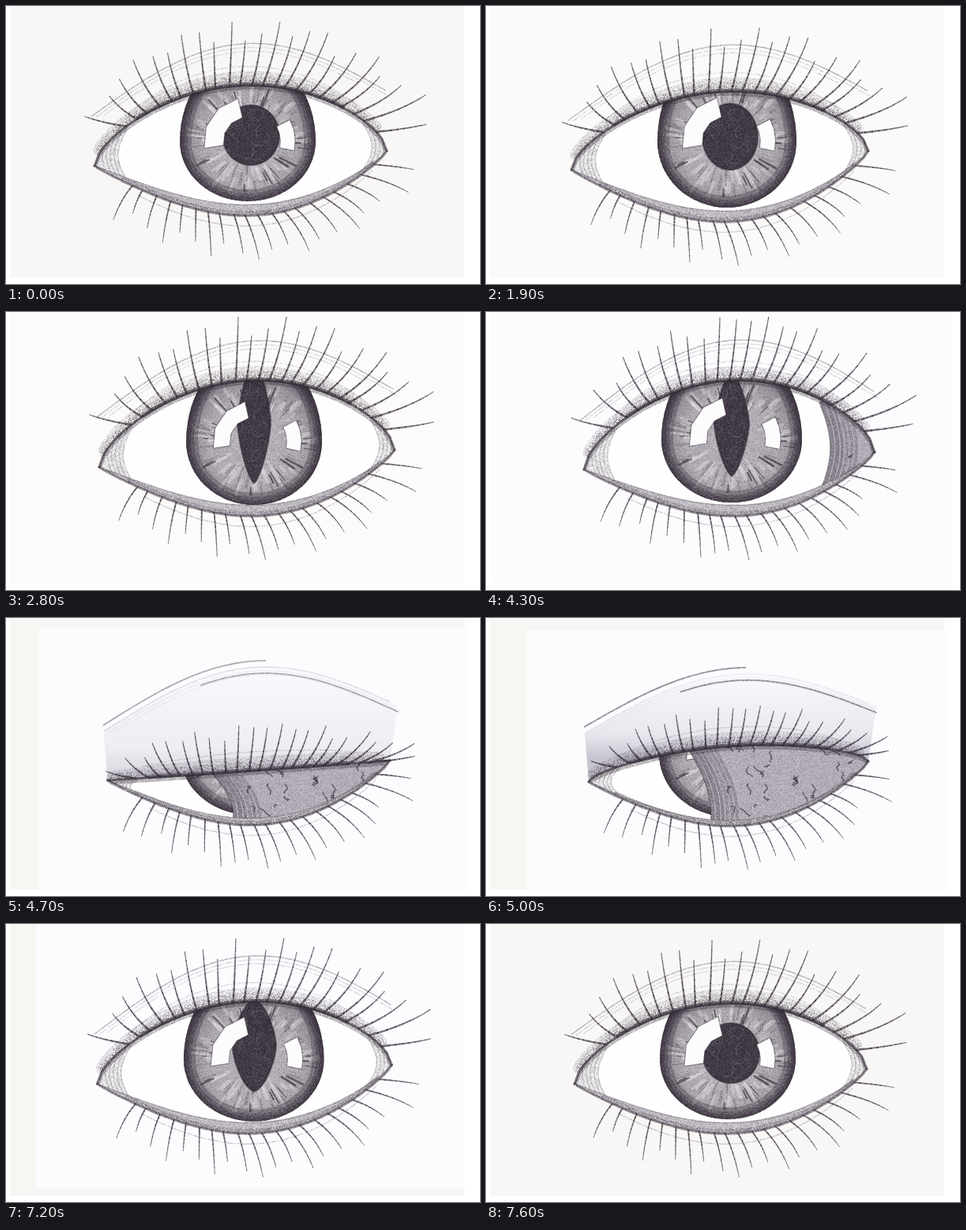
Animation, 600 px wide and 353 px high, one loop 7.7 s. Source, as an HTML page with a canvas:

```html
<!DOCTYPE html>
<html lang="en">
<head>
<meta charset="utf-8">
<title>Pencil eye</title>
<style>
html, body { margin: 0; width: 100%; height: 100%; overflow: hidden; background: #fff; }
canvas { display: block; width: 600px; height: 353px; }
</style>
</head>
<body>
<canvas id="stage" width="600" height="353"></canvas>
<script>
const ctx = document.getElementById('stage').getContext('2d');
const LOOP = 7700, STEP = 100, TAU = Math.PI * 2;

// left/right: eye corners; top/low/crown: heights of the lids and the crease;
// iris and pupil: centre and radii; haw: x of the third eyelid.
const round = {
  paper: '#f8f7f5', sheet: '#f8f7f5', frame: [5, 0, 575, 345],
  left: [112, 203], right: [482, 184], top: 101, low: 267, crown: 48,
  iris: [306, 172, 86, 76], pupil: [310, 164, 36, 38], slit: 0, haw: 500, shut: 0, lash: 1
};
const angular = {
  ...round, paper: '#fbfaf9', sheet: '#fbfaf9',
  left: [108, 208], right: [484, 184], top: 109, low: 275, crown: 50,
  iris: [305, 172, 88, 84], pupil: [309, 166, 35, 42]
};
const slit = {
  ...round, paper: '#fcfbf9', sheet: '#fcfbf9',
  left: [118, 197], right: [492, 175], top: 87, low: 260, crown: 37,
  iris: [314, 165, 86, 80], pupil: [314, 140, 21, 77], slit: 1
};
const hawStart = {
  ...slit, paper: '#fcfbfd', sheet: '#fcfbfd', frame: [12, 0, 576, 353],
  left: [124, 200], right: [492, 178], crown: 36,
  iris: [311, 162, 89, 80], pupil: [311, 142, 22, 66], haw: 430
};
const reopened = {
  ...slit, paper: '#f6f6f3', sheet: '#fcfbfe', frame: [53, 0, 527, 333],
  left: [117, 203], right: [491, 177], top: 98, low: 267, crown: 38,
  iris: [317, 172, 90, 80], pupil: [316, 150, 24, 67]
};
const half = {
  ...reopened, frame: [52, 15, 530, 330],
  left: [130, 208], right: [484, 182], top: 163, low: 265, crown: 72,
  iris: [306, 172, 87, 80], haw: 265, shut: 1, lash: 0.62
};
const closed = { ...half, top: 230, haw: 215 };
const widening = mix(reopened, round, 0.3);

const keys = [[0, round], [1800, round], [1900, angular], [2000, angular], [2500, slit], [4200, slit],
  [4300, hawStart], [4400, hawStart], [4800, closed], [5000, half], [5400, reopened], [7100, reopened],
  [7200, widening], [7300, widening], [7600, round], [LOOP, round]];

function mix(a, b, k) {
  if (typeof a === 'number') return a + (b - a) * k;
  if (typeof a === 'string') return k < 0.5 ? a : b;
  if (Array.isArray(a)) return a.map((v, i) => mix(v, b[i], k));
  return Object.fromEntries(Object.keys(a).map(n => [n, mix(a[n], b[n], k)]));
}

function poseAt(t) {
  const i = keys.findIndex(([end]) => end > t) - 1;
  const [t0, a] = keys[i], [t1, b] = keys[i + 1];
  return mix(a, b, (t - t0) / (t1 - t0));
}

let seed = 1;
function rand() {
  seed = (seed * 16807) % 2147483647;
  return seed / 2147483647;
}

// Grainy graphite as a fill or stroke style.
const leads = {};
function lead(tone) {
  if (leads[tone]) return leads[tone];
  const size = 160, tile = document.createElement('canvas');
  tile.width = tile.height = size;
  const g = tile.getContext('2d'), image = g.createImageData(size, size);
  for (let i = 0; i < size * size; i++) {
    const alpha = Math.max(0, Math.min(1, tone + (rand() + rand() - 1) * 0.22));
    image.data.set([50, 42, 53, alpha * 255], i * 4);
  }
  g.putImageData(image, 0, 0);
  return leads[tone] = ctx.createPattern(tile, 'repeat');
}
[0.06, 0.12, 0.2, 0.32, 0.5, 0.65, 0.88].forEach(lead);

function draw(path, tone, width) {
  ctx.strokeStyle = lead(tone);
  ctx.lineWidth = width;
  ctx.stroke(path);
}

function shade(path, tone) {
  ctx.fillStyle = lead(tone);
  ctx.fill(path);
}

// Path through point(u) for u from a to b, optionally appended to another path.
function trace(point, a = 0, b = 1, path = new Path2D(), steps = 60) {
  for (let i = 0; i <= steps; i++) path.lineTo(...point(a + (b - a) * i / steps));
  return path;
}

const arch = (u, power) => Math.pow(Math.max(0, Math.sin(Math.PI * u)), power);

function lids(p) {
  const chord = u => mix(p.left, p.right, u);
  const middle = chord(0.5)[1];
  const shift = (dx, dy, u) => { const [x, y] = chord(u); return [x + dx, y + dy]; };
  return {
    upper: u => shift(0, (p.top - middle) * arch(u, 0.6), u),
    lower: u => shift(0, (p.low - middle) * arch(Math.pow(u, 1.15), 0.8), u),
    crease: u => shift(15 * u - 5, -62 - 8 * u - (middle - 66 - p.crown) * arch(u, 1), u),
    uAt: x => Math.max(0, Math.min(1, (x - p.left[0]) / (p.right[0] - p.left[0])))
  };
}
const offset = (curve, dy, power = 0) => u => {
  const [x, y] = curve(u);
  return [x, y + dy * arch(u, power)];
};

function drawPaper(p) {
  ctx.fillStyle = '#fff';
  ctx.fillRect(0, 0, 600, 353);
  ctx.fillStyle = p.paper;
  ctx.fillRect(5, 0, 575, 345);
  ctx.fillStyle = p.sheet;
  ctx.fillRect(...p.frame);
}

function drawSkin(p, lid) {
  if (p.shut > 0) {
    const skin = trace(lid.upper, 1, 0, trace(lid.crease));
    const tone = ctx.createLinearGradient(0, p.crown, 0, p.top + 15);
    tone.addColorStop(0, 'rgba(120,115,140,.02)');
    tone.addColorStop(0.7, 'rgba(120,115,140,.14)');
    tone.addColorStop(1, 'rgba(120,115,140,.4)');
    ctx.globalAlpha = p.shut;
    ctx.fillStyle = tone;
    ctx.fill(skin);
    draw(trace(offset(lid.crease, -8), 0, 0.55), 0.5, 1.8);
    draw(trace(offset(lid.crease, 8), 0.33, 1), 0.5, 1.8);
    ctx.globalAlpha = 1;
  }
  ctx.globalAlpha = 1 - p.shut * 0.8;
  for (let i = 0; i < 3; i++) {
    draw(trace(offset(lid.crease, i * 5), rand() * 0.1, 0.85 + rand() * 0.15), i ? 0.12 : 0.32, 1.4);
  }
  ctx.globalAlpha = 1;
  draw(trace(offset(lid.upper, -24, 0.5), 0.1, 0.9), 0.12, 1.4);
  draw(trace(offset(lid.lower, 13, 0.5), 0.15, 0.95), 0.2, 1.3);
  for (const width of [18, 12, 7]) {
    draw(trace(offset(lid.upper, -width / 2, 0.5), 0.02, 0.96), 0.12, width);
  }
}

function ring(cx, cy, rx, ry) {
  const path = new Path2D();
  path.ellipse(cx, cy, rx, ry, 0, 0, Math.PI);
  path.ellipse(cx, cy, rx, ry * 1.45, 0, Math.PI, TAU);
  return path;
}

function drawGlint([cx, cy, r], a0, a1, inner, outer) {
  const arc = k => a => [cx + Math.cos(a) * r * k, cy + Math.sin(a) * r * k];
  const path = trace(arc(inner), a1, a0, trace(arc(outer), a0, a1, undefined, 3), 3);
  path.closePath();
  ctx.fillStyle = '#fdfcfd';
  ctx.fill(path);
  draw(path, 0.5, 1.2);
}

function drawPupil(p) {
  const [cx, cy, w, h] = p.pupil;
  const bend = v => Math.sign(v) * Math.pow(Math.abs(v), 1 + p.slit * 0.4);
  const pupil = trace(a => [cx + bend(Math.cos(a)) * w, cy + bend(Math.sin(a)) * h], 0, TAU);
  shade(pupil, 0.88);
  draw(pupil, 0.65, 2);
  ctx.save();
  ctx.clip(pupil);
  ctx.strokeStyle = 'rgba(150,140,155,.35)';
  ctx.lineWidth = 1;
  for (let i = 0; i < 16; i++) {
    ctx.beginPath();
    ctx.arc(cx + (rand() - 0.5) * w * 1.6, cy + (rand() - 0.5) * h * 1.6, 4 + rand() * 9, i, i + 2);
    ctx.stroke();
  }
  ctx.restore();
}

function drawIris(p) {
  const [cx, cy, rx, ry] = p.iris;
  const disc = ring(cx, cy, rx, ry);
  ctx.save();
  ctx.clip(disc);
  const tone = ctx.createRadialGradient(cx, cy, 25, cx, cy, rx * 1.05);
  tone.addColorStop(0, '#c6c1c8');
  tone.addColorStop(0.5, '#c0bbc2');
  tone.addColorStop(0.8, '#a29ba4');
  tone.addColorStop(1, '#6b636d');
  ctx.fillStyle = tone;
  ctx.fill(disc);
  shade(disc, 0.12);
  for (let i = 0; i < 150; i++) {
    const a = rand() * TAU, bold = i % 7 === 0;
    const outer = 0.62 + rand() * 0.33, inner = outer - 0.1 - rand() * 0.18;
    const ray = trace(k => [cx + Math.cos(a) * rx * k, cy + Math.sin(a) * ry * k], inner, outer, undefined, 1);
    if (bold || i % 2) {
      draw(ray, bold ? 0.65 : 0.2, 1 + rand() * 2);
    } else {
      ctx.strokeStyle = 'rgba(245,242,246,.3)';
      ctx.lineWidth = 2 + rand() * 3;
      ctx.stroke(ray);
    }
  }
  for (const width of [30, 20, 12, 5]) draw(disc, 0.32, width);
  drawPupil(p);
  drawGlint(p.iris, Math.PI * 0.95, Math.PI * 1.43, 0.36, 0.65 - p.slit * 0.04);
  drawGlint(p.iris, -0.48, 0.2, 0.48, 0.7);
  ctx.restore();
}

// The third eyelid sweeps in from the right corner.
function drawHaw(p, lid) {
  const x = p.haw;
  if (x > 485) return;
  const base = x - 8 + (430 - x) * 0.17;
  const top = lid.upper(lid.uAt(x))[1], low = lid.lower(lid.uAt(base))[1];
  const edge = k => [mix(x - 8, base, k) + 14 * arch(k, 1) * (x / 430), mix(top, low, k)];
  const area = trace(edge);
  area.lineTo(500, 290);
  area.lineTo(500, 70);
  area.closePath();
  ctx.save();
  ctx.clip(area);
  ctx.fillStyle = '#c3bec8';
  ctx.fill(area);
  shade(area, 0.12);
  for (let i = 0; i < 36; i++) {
    let vx = 285 + rand() * 180, vy = 150 + rand() * 105;
    const vein = new Path2D();
    vein.moveTo(vx, vy);
    for (let s = 0; s < 4; s++) vein.lineTo(vx += rand() * 9 - 4.5, vy += rand() * 6 - 1);
    if (vx > x + 30) draw(vein, 0.65, 1.4);
  }
  for (let d = 3; d < 34; d += 6) {
    draw(trace(k => [edge(k)[0] + d, edge(k)[1]]), d < 16 ? 0.32 : 0.2, 3 + rand() * 3);
  }
  ctx.restore();
  draw(trace(edge), 0.5, 1.8);
}

function drawCorner(lid, u, side) {
  const [x, y0] = lid.upper(u), y1 = lid.lower(u)[1];
  const fold = d => k => [x + side * (5 - d - 12 * arch(k, 1)), mix(y0, y1, k)];
  const area = trace(fold(0));
  area.lineTo(x - side * 60, y1);
  area.lineTo(x - side * 60, y0);
  shade(area, 0.12);
  for (let d = 0; d < 22; d += 5) draw(trace(fold(d)), 0.2, 1.5);
}

function drawEye(p, lid) {
  const opening = trace(lid.lower, 1, 0, trace(lid.upper));
  ctx.save();
  ctx.clip(opening);
  ctx.fillStyle = '#fefefe';
  ctx.fill(opening);
  drawIris(p);
  drawCorner(lid, 0.1, 1);
  drawCorner(lid, 0.93, -1);
  drawHaw(p, lid);
  const inner = offset(lid.lower, -14 + p.shut * 7, 0.7);
  const rim = trace(inner, 1, 0, trace(lid.lower));
  ctx.fillStyle = '#e3dfe5';
  ctx.fill(rim);
  shade(rim, 0.2);
  draw(trace(inner), 0.32, 1.5);
  draw(trace(offset(lid.lower, -3), 0.1, 0.95), 0.2, 6);
  draw(trace(offset(lid.upper, 3)), 0.32, 5);
  ctx.restore();
  draw(trace(lid.lower), 0.5, 3);
  draw(trace(lid.upper), 0.65, 3);
  draw(trace(offset(lid.upper, -1), 0.15, 0.85), 0.5, 5);
}

function drawLash([rx, ry], dx, dy, weight) {
  const at = k => [rx + dx * k * (1.24 - 0.24 * k), ry + dy * k * (0.8 + 0.2 * k)];
  for (let k = 0; k < 1; k += 0.125) {
    draw(trace(at, k, k + 0.125, undefined, 2), 0.65, weight * (1.1 - 0.65 * k));
  }
}

// Lashes fan outwards along the lids, in uneven lengths.
function drawLashes(p, lid) {
  const upper = 23, lower = 20;
  for (let i = 0; i < upper; i++) {
    const f = i / (upper - 1), size = p.lash * (i % 3 ? 0.7 + rand() * 0.3 : 1.05);
    drawLash(lid.upper(0.1 + 0.86 * f + rand() * 0.01), (-50 + 130 * f) * size,
      (-12 - 66 * arch(Math.pow(f, 0.9), 0.6)) * size, 2.3);
  }
  for (let i = 0; i < lower; i++) {
    const f = i / (lower - 1), size = i % 3 ? 0.6 + rand() * 0.3 : 1;
    drawLash(lid.lower(0.12 + 0.83 * f + rand() * 0.01), (-24 + 88 * f) * size,
      (8 + 48 * arch(0.2 + 0.8 * f, 0.6)) * size, 1.8);
  }
}

function render(t) {
  seed = 4271;
  const p = poseAt(t), lid = lids(p);
  ctx.lineCap = ctx.lineJoin = 'round';
  drawPaper(p);
  drawSkin(p, lid);
  drawEye(p, lid);
  drawLashes(p, lid);
}

let shown = -1;
function tick() {
  const t = Math.floor(performance.now() % LOOP / STEP) * STEP;
  if (t !== shown) render(shown = t);
  requestAnimationFrame(tick);
}
tick();
</script>
</body>
</html>
```
